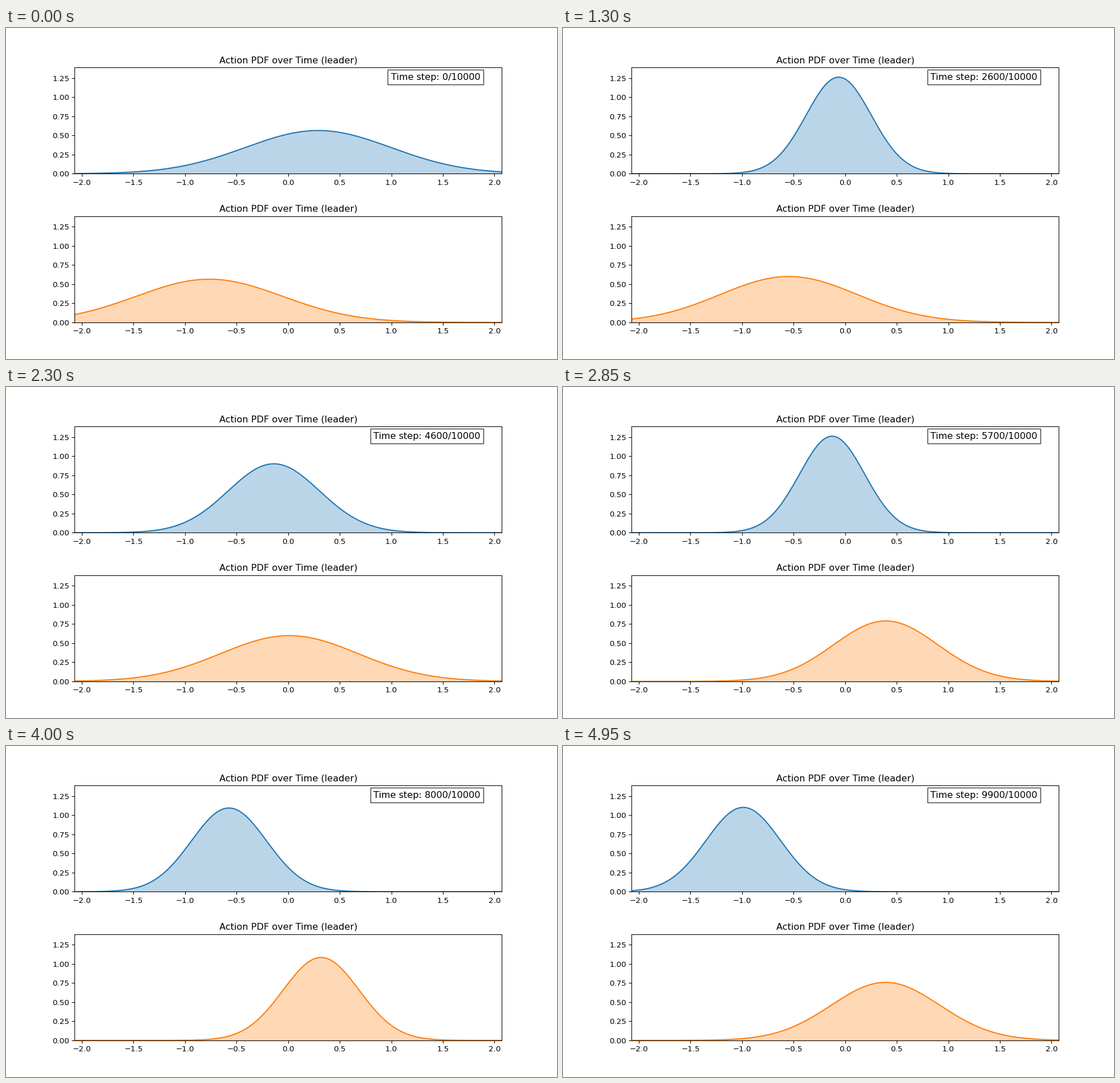
Animation of 966x580 px, one loop 5000 ms. Source, as a matplotlib script:

```python
import numpy as np
import matplotlib.pyplot as plt
from matplotlib.animation import FuncAnimation

W, H, DPI = 966, 580, 96.6
NUDGE = 0.4  # pixels left and up, so that lines snap to the right pixel rows
FRAMES, INTERVAL = 100, 50
STEPS = 10000
X_MAX = 2.07
S_MIN, S_MAX = np.sqrt(0.1), np.sqrt(0.5)
Y_MAX = 1.1 / (S_MIN * np.sqrt(2 * np.pi))

# Mean and spread of each policy at a few moments of the run
KEYS = [0, 26, 46, 57, 72, 88, 99]
POLICIES = [
    dict(color="C0",
         mean=[0.29, -0.063, -0.139, -0.127, -0.18, -0.968, -0.988],
         std=[S_MAX, S_MIN, 0.443, S_MIN, S_MIN, 0.413, 0.362]),
    dict(color="C1",
         mean=[-0.764, -0.547, 0.011, 0.393, 0.334, 0.304, 0.391],
         std=[S_MAX, 0.665, 0.667, 0.505, 0.42, S_MIN, 0.526]),
]

plt.rcParams["font.family"] = "DejaVu Sans"
x = np.linspace(-X_MAX, X_MAX, 500)


def pdf(policy, frame):
    mean = np.interp(frame, KEYS, policy["mean"])
    std = np.interp(frame, KEYS, policy["std"])
    return np.exp(-0.5 * ((x - mean) / std) ** 2) / (std * np.sqrt(2 * np.pi))


def area(y):
    return np.column_stack([np.r_[x, x[::-1]], np.r_[y, np.zeros_like(y)]])


# The small margin keeps the pixel size from rounding down
fig, axes = plt.subplots(2, 1, figsize=((W + 0.01) / DPI, (H + 0.01) / DPI),
                         dpi=DPI)
dx, dy = NUDGE / W, NUDGE / H
fig.subplots_adjust(left=0.125 - dx, right=0.9 - dx,
                    bottom=0.11 + dy, top=0.88 + dy, hspace=0.4)

curves = []
for ax, policy in zip(axes, POLICIES):
    y = pdf(policy, 0)
    line, = ax.plot(x, y, color=policy["color"])
    fill = ax.fill_between(x, y, color=policy["color"], alpha=0.3)
    ax.set_title("Action PDF over Time (leader)")
    ax.set_xlim(-X_MAX, X_MAX)
    ax.set_ylim(0, Y_MAX)
    ax.set_xticks(np.arange(-2, 2.1, 0.5))
    ax.set_yticks(np.arange(0, 1.3, 0.25))
    curves.append((policy, line, fill))

label = axes[0].text(0.95, 0.95, "", transform=axes[0].transAxes, fontsize=12,
                     ha="right", va="top",
                     bbox=dict(facecolor="white", alpha=0.8))


def update(frame):
    for policy, line, fill in curves:
        y = pdf(policy, frame)
        line.set_ydata(y)
        fill.set_verts([area(y)])
    label.set_text(f"Time step: {frame * STEPS // FRAMES}/{STEPS}")


anim = FuncAnimation(fig, update, frames=FRAMES, interval=INTERVAL,
                     init_func=lambda: update(0), repeat=True, repeat_delay=0)
plt.show()
```
